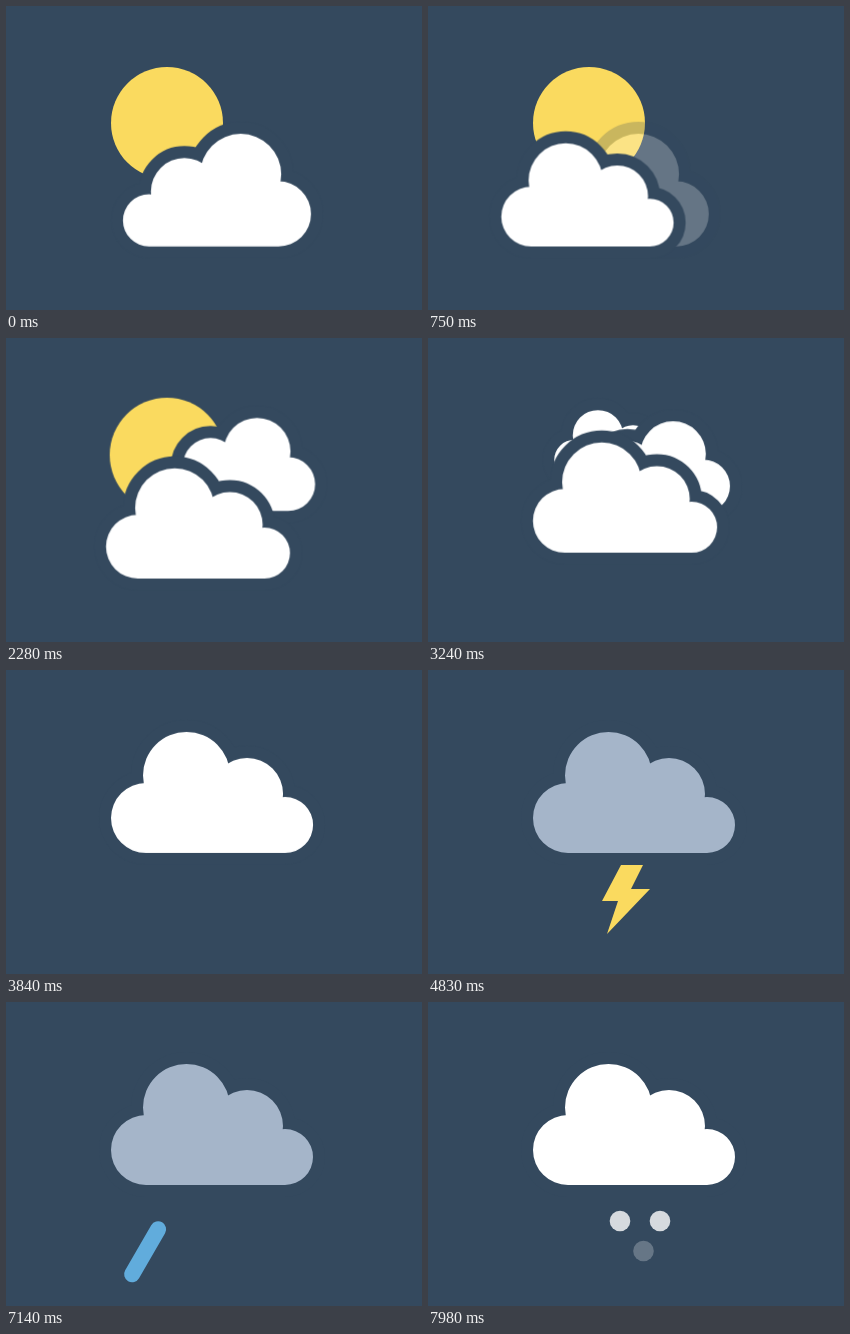
An HTML page that plays this animation: 416 px wide and 304 px high, repeating every 8 s.

```html
<!DOCTYPE html>
<html lang="en">
<head>
<meta charset="utf-8">
<title>Weather</title>
<style>
html, body { margin: 0; width: 100%; height: 100%; overflow: hidden; background: #34495e; }
svg { display: block; width: 416px; height: 304px; }
svg * { animation: 8s linear infinite; }

/* Each cloud carries a gap in the background colour around it */
.cloud {
  fill: #fff; stroke: #34495e; stroke-width: 24px; stroke-linejoin: round;
  paint-order: stroke; vector-effect: non-scaling-stroke;
}
.gold { fill: #fada5f; }
.drop { fill: none; stroke-width: 16px; stroke-linecap: round; stroke-dasharray: 52 400; }
.flake { fill: #fff; }

#sun { animation-name: sun; }
#first { animation-name: first; }
#main { animation-name: main, tint; }
#right { animation-name: right; }
#left { animation-name: left; }
#bolt { animation-name: bolt; }
#dropA { stroke: #61acdc; animation-name: dropA; }
#dropB { stroke: #fff; animation-name: dropB; }
.flake { animation-name: flake; }
.late { animation-name: late; }

@keyframes sun {
  0%, 28.125% { transform: translate(161px, 117px) scale(1); }
  28.5% { transform: translate(161px, 117px) scale(1.02); animation-timing-function: ease-out; }
  30% { transform: translate(161px, 117px) scale(1.22); animation-timing-function: ease-in; }
  31.875%, 100% { transform: translate(161px, 117px) scale(0); }
}
@keyframes first {
  0%, 7.875% { transform: translate(211px, 240.5px) scale(-.931, .931); opacity: 1; }
  9.875%, 100% { transform: translate(179px, 240.5px) scale(-.931, .931); opacity: 0; }
}
@keyframes main {
  0%, 7.875% { transform: translate(118px, 240.5px) scale(.66); opacity: 0; }
  8.625% { opacity: 1; }
  9.375% { transform: translate(159px, 240.5px) scale(.851); animation-timing-function: ease-out; }
  11.625% { transform: translate(209px, 240.5px) scale(1.09); animation-timing-function: ease-in-out; }
  15.375%, 18.75% { transform: translate(206px, 240.5px) scale(1); animation-timing-function: ease-out; }
  22.875%, 39% { transform: translate(192px, 240.5px) scale(.911); animation-timing-function: ease-in; }
  40.5% { transform: translate(197px, 215px) scale(.911); animation-timing-function: ease-out; }
  43.5% { transform: translate(205px, 179px) scale(1.04); animation-timing-function: ease-in-out; }
  48.375%, 100% { transform: translate(206px, 183px) scale(1); opacity: 1; }
}
@keyframes tint {
  0%, 54.75% { fill: #fff; }
  60.375%, 93% { fill: #a5b5c9; }
  99.125%, 100% { fill: #fff; }
}
@keyframes right {
  0%, 18.74% { transform: translate(210px, 230px) scale(-.6, .6); opacity: 0; }
  18.75% { transform: translate(210px, 230px) scale(-.6, .6); opacity: 1; animation-timing-function: ease-out; }
  22.875%, 39% { transform: translate(231.5px, 173px) scale(-.769, .769); }
  40.5% { transform: translate(226px, 174.5px) scale(-.755, .755); }
  42.5% { transform: translate(206px, 178px) scale(-.6, .6); opacity: 1; }
  42.51%, 100% { transform: translate(206px, 178px) scale(-.6, .6); opacity: 0; }
}
@keyframes left {
  0%, 31.49% { transform: translate(166px, 118px) scale(0); opacity: 0; }
  31.5% { transform: translate(166px, 118px) scale(0); opacity: 1; animation-timing-function: ease-out; }
  33.75% { transform: translate(178.6px, 132px) scale(.66); animation-timing-function: ease-in-out; }
  35.625%, 39% { transform: translate(178.6px, 132px) scale(.6); }
  40.5% { transform: translate(184.6px, 142px) scale(.58); }
  42.5% { transform: translate(206px, 178px) scale(.5); opacity: 1; }
  42.51%, 100% { transform: translate(206px, 178px) scale(.5); opacity: 0; }
}
@keyframes bolt {
  0%, 54.75% { transform: translateY(-75px); animation-timing-function: ease-out; }
  57.75% { transform: translateY(12px); animation-timing-function: ease-in-out; }
  60.375%, 64.125% { transform: translateY(0); animation-timing-function: ease-in; }
  67.875%, 100% { transform: translateY(112px); }
}
/* 0 = above the clip, -75 = at rest, -165 = run off the end of the path */
@keyframes dropA {
  0%, 70.5% { stroke-dashoffset: 0; animation-timing-function: ease-out; }
  73.875%, 76.875% { stroke-dashoffset: -75; }
  77.25% { stroke-dashoffset: -81; }
  78.75% { stroke-dashoffset: -165; }
  78.76% { stroke-dashoffset: 0; animation-timing-function: ease-out; }
  81%, 86.25% { stroke-dashoffset: -75; animation-timing-function: ease-in; }
  92.625%, 100% { stroke-dashoffset: -165; }
}
@keyframes dropB {
  0%, 67.125% { stroke-dashoffset: 0; animation-timing-function: ease-out; }
  70.5%, 74.25% { stroke-dashoffset: -75; animation-timing-function: ease-in; }
  75.75% { stroke-dashoffset: -165; }
  75.76% { stroke-dashoffset: 0; animation-timing-function: ease-out; }
  77.25%, 82.875% { stroke-dashoffset: -75; animation-timing-function: ease-in; }
  87%, 100% { stroke-dashoffset: -165; }
}
@keyframes flake {
  0%, 96.25% { opacity: 0; }
  99.75%, 100% { opacity: .8; }
}
@keyframes late {
  0%, 98.125% { opacity: 0; }
  99.75%, 100% { opacity: .25; }
}
</style>
</head>
<body>
<svg viewBox="0 0 416 304">
  <defs>
    <clipPath id="below"><rect y="195" width="416" height="109"/></clipPath>
  </defs>
  <circle id="sun" class="gold" r="56"/>
  <path id="left" class="cloud"/>
  <path id="right" class="cloud"/>
  <path id="first" class="cloud"/>
  <path id="main" class="cloud"/>
  <g clip-path="url(#below)">
    <path id="bolt" class="gold" d="M193 195H215L203 219H222L179 264L190 231H174Z"/>
    <path id="dropA" class="drop" d="M202.6 140L122.2 279"/>
    <path id="dropB" class="drop" d="M279.6 140L199.2 279"/>
  </g>
  <circle class="flake" cx="192" cy="219" r="10.3"/>
  <circle class="flake" cx="232" cy="219" r="10.3"/>
  <circle class="flake late" cx="215.5" cy="249" r="10.3"/>
</svg>
<script>
// Cloud outline: four lobes on a flat base, origin at bottom centre
const lobe = (x, y, r) => `M${x - r} ${y}a${r} ${r} 0 1 1 ${2 * r} 0a${r} ${r} 0 1 1 ${-2 * r} 0z`;
const shape = lobe(-66, -35, 35) + lobe(-25.5, -77.5, 43.5) + lobe(35, -59, 36) +
  lobe(73, -28, 28) + 'M-66 -50H73V0H-66z';
for (const cloud of document.querySelectorAll('.cloud')) cloud.setAttribute('d', shape);
</script>
</body>
</html>
```
